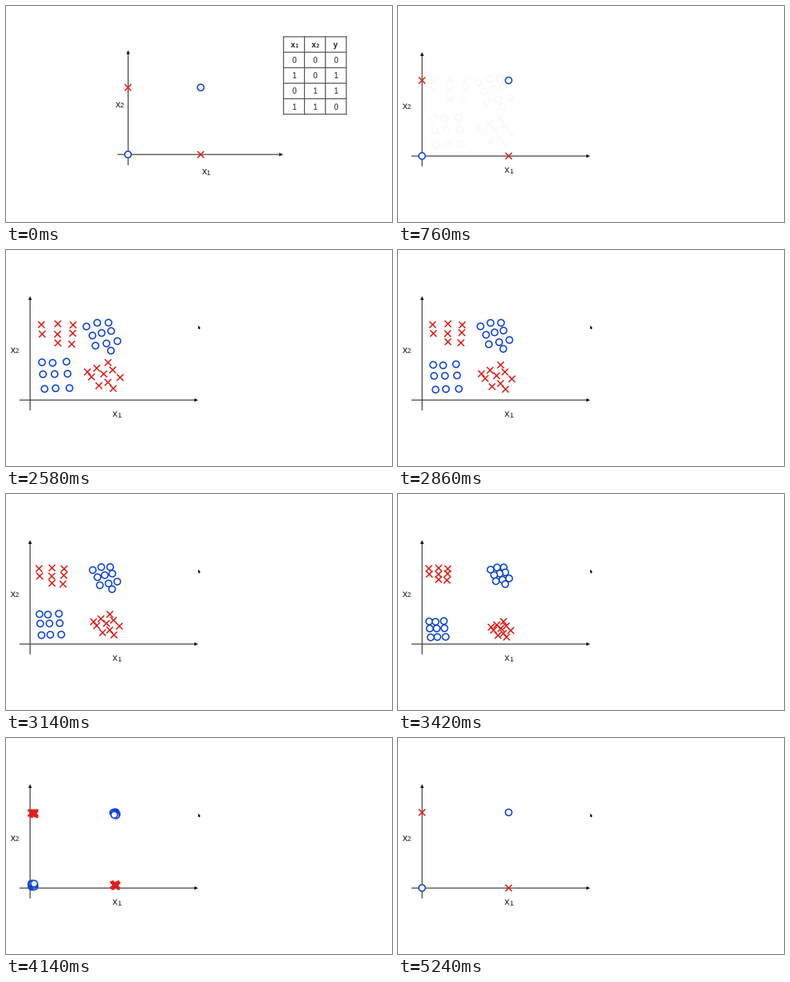
Recreate the animation shown at these times as a matplotlib script. Size 500 by 281 pixels, loop 5.3 s.

```python
import numpy as np
import matplotlib.pyplot as plt
from itertools import product
from matplotlib.animation import FuncAnimation

W, H, DPI = 500, 281, 64
PX = 72 / DPI  # points per pixel
STEP, LOOP = 20, 5300
RED, BLUE, INK, GRID = "#e01f1a", "#0a42d2", "#404040", "#555555"

rng = np.random.default_rng(4)
fig = plt.figure(figsize=(W / DPI, H / DPI), dpi=DPI, facecolor="white")
ax = fig.add_axes([0, 0, 1, 1])
ax.set_xlim(0, W)
ax.set_ylim(H, 0)
ax.axis("off")


def line(xs, ys, color=INK):
    return ax.plot(xs, ys, color=color, lw=1.25 * PX, snap=False, zorder=1)[0]


def poly(pts, z=1):
    return ax.fill(*zip(*pts), color="#151515", lw=0, zorder=z)[0]


def text(x, y, s, size, ha="left", weight="normal"):
    return ax.text(x, y, s, fontsize=size * PX, family="Liberation Sans",
                   ha=ha, va="baseline", weight=weight, color="#1c1c1c", zorder=2)


def label(x, y, sub):
    return [text(x, y, "x", 12.8), text(x + 5.9, y + 0.8, sub, 9)]


def plot_axes(ox, oy, left, right, top, bottom):
    return [
        line([ox, ox], [top + 3, bottom]),
        line([left, right - 3], [oy, oy]),
        poly([(ox, top), (ox - 2.3, top + 5), (ox + 2.3, top + 5)]),
        poly([(right, oy), (right - 5, oy - 2.3), (right - 5, oy + 2.3)]),
    ]


def marks(pts, shape, z):
    """Crosses or white-filled rings, placed with sub-pixel accuracy."""
    x, y = np.transpose(pts)
    widths = [1.6 * PX] * len(x)
    size = (8.5 * PX) ** 2
    if shape == "x":
        return ax.scatter(x, y, s=size, marker="x", c=RED,
                          linewidths=widths, zorder=z)
    return ax.scatter(x, y, s=size, marker="o", facecolors="white",
                      edgecolors=BLUE, linewidths=widths, zorder=z)


def truth_table(x0, y0, col, row):
    x1, y1 = x0 + 3 * col, y0 + 5 * row
    parts = [line([x, x], [y0, y1], GRID) for x in np.linspace(x0, x1, 4)]
    parts += [line([x0, x1], [y, y], GRID) for y in np.linspace(y0, y1, 6)]
    centers = x0 + col * (np.arange(3) + 0.5)
    for cx, sub in zip(centers, "12"):
        parts.append(text(cx - 4.6, y0 + 13.6, "x", 10, weight="bold"))
        parts.append(text(cx + 1.2, y0 + 14.5, sub, 6.8, weight="bold"))
    parts.append(text(centers[2], y0 + 13.6, "y", 10, "center", "bold"))
    for j, (b, a) in enumerate(product((0, 1), repeat=2), 1):
        for cx, bit in zip(centers, (a, b, a ^ b)):
            parts.append(text(cx, y0 + j * row + 14, str(bit), 10, "center"))
    return parts


def cloud(start, along, across, counts):
    """Slanted rows of points, loosened by a little jitter."""
    pts = [np.add(start, np.multiply(along, i) + np.multiply(across, j))
           for j, n in enumerate(counts) for i in range(n)]
    return np.array(pts) + rng.uniform(-1.8, 1.8, (len(pts), 2))


# Opening view with the truth table
intro = plot_axes(158.2, 193.2, 145, 359, 57.5, 206.5)
intro += label(142, 131.5, "2") + label(253.5, 219.3, "1")
intro += truth_table(359.5, 40, 27.1, 20.15)
intro += [marks([(158, 106), (252.2, 193.2)], "x", 4),
          marks([(158, 193.2), (252.2, 106)], "o", 4)]

# Cluster view
TL, TR, BL, BR = product((31.1, 143.3), (96.8, 195.1))
TR, BL = BL, TR
main = plot_axes(31.2, 195.2, 18, 249, 60, 208)
main += label(5.7, 133.5, "2") + label(138, 217.3, "1")
single = [marks([TL, BR], "x", 4), marks([BL, TR], "o", 4)]

groups = [
    (TL, "x", cloud((85.5, 97.5), (-20, 0), (0, 12), (3, 3, 2))),
    (TR, "o", cloud((131, 93), (6.3, 12), (-13.5, 3), (3, 4, 3))),
    (BL, "o", cloud((50, 180), (-2, -17.5), (15.5, 0), (3, 3, 3))),
    (BR, "x", cloud((131, 147), (7.6, 9.5), (-13.5, 5), (3, 4, 3))),
]
clouds = [(marks(pts, shape, 3), pts, np.array(corner))
          for corner, shape, pts in groups]

ARROW = np.array([(0, 0), (0, 4.4), (1.8, 5.2), (3, 3.1)])
cursor = poly(ARROW, 5)


def ramp(t, start, end):
    return min(max((t - start) / (end - start), 0.0), 1.0)


def ease(u):
    return (1 - np.cos(np.pi * u)) / 2


def draw(i):
    t = i * STEP
    opening = t < 180
    for part in intro:
        part.set_visible(opening)
    for part in main:
        part.set_visible(not opening)

    spread = ramp(t, 740, 1280)
    merged = ramp(t, 4600, 5140)
    alone = max(1 - spread, merged)
    for part in single:
        part.set_visible(not opening and alone > 0)
        part.set_alpha(alone)

    pull = ease(ramp(t, 2505, 4595))
    for part, pts, corner in clouds:
        part.set_visible(spread > 0 and merged < 1)
        part.set_alpha(min(spread, 1 - merged))
        part.set_offsets(pts + (corner - pts) * pull)

    glide = ease(ramp(t, 1860, 2560))
    cursor.set_visible(t >= 1860)
    cursor.set_xy(ARROW + (255.5 - 6.7 * glide, 108 - 10 * glide))
    return []


anim = FuncAnimation(fig, draw, frames=LOOP // STEP, interval=STEP,
                     repeat=True, repeat_delay=0, blit=False)
plt.show()
```
